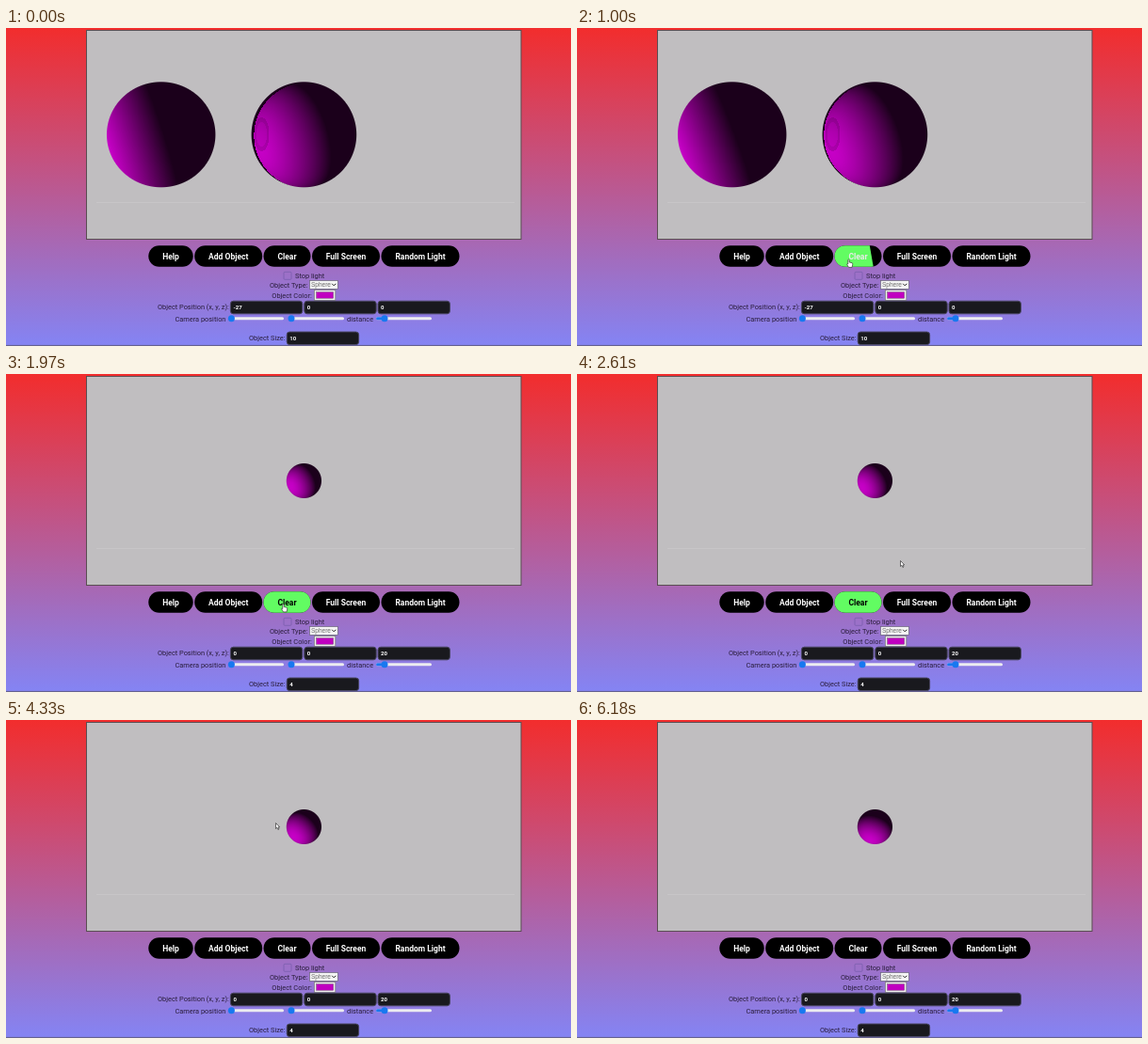
An HTML page with a canvas that plays this animation: 600 by 338 pixels, repeating every 6210 ms.

```html
<!DOCTYPE html>
<html lang="en">
<head>
<meta charset="utf-8">
<title>Sphere lighting demo</title>
<style>
  html, body { margin: 0; width: 100%; height: 100%; overflow: hidden; }
  body { background: linear-gradient(#f22d2d, #8484f4); }
  canvas, svg { position: absolute; left: 0; top: 0; width: 600px; height: 338px; }
  text { font: 7.4px Roboto, sans-serif; fill: #2a1d3c; }
  .btn { font-weight: 700; font-size: 8.5px; fill: #fff; text-anchor: middle; }
  .val { font-weight: 700; font-size: 6px; fill: #fff; }
  .opt { font: 6.5px "Liberation Sans", sans-serif; fill: #6c6c6c; }
</style>
</head>
<body>
<canvas id="view" width="600" height="338"></canvas>
<svg id="ui" viewBox="0 0 600 338"></svg>
<script>
const LOOP = 6210;
const CLEAR_FIELDS = 1310, CLEAR_SCENE = 1890;
const ui = document.getElementById('ui');
const view = document.getElementById('view').getContext('2d');

function add(tag, attrs, parent = ui) {
  const el = document.createElementNS('http://www.w3.org/2000/svg', tag);
  for (const k in attrs) el.setAttribute(k, attrs[k]);
  parent.appendChild(el);
  return el;
}

function box(x, y, width, height, fill, more = {}) {
  return add('rect', { x, y, width, height, fill, ...more });
}

function label(str, x, y, cls = '') {
  const el = add('text', { x, y, class: cls });
  el.textContent = str;
  return el;
}

// Buttons; the Clear pill carries a sliding fill
const pill = { rx: 11.3 };
const clip = add('clipPath', { id: 'pill' });
add('rect', { x: 273.5, y: 231.2, width: 50, height: 22.6, ...pill }, clip);
let fill, clearText;
for (const [name, x, w] of [
  ['Help', 151.3, 47.4], ['Add Object', 200.2, 72], ['Clear', 273.5, 50],
  ['Full Screen', 325, 72], ['Random Light', 398.5, 83]
]) {
  box(x, 231.2, w, 22.6, '#000', pill);
  if (name === 'Clear') fill = add('polygon', { fill: '#62fc62', 'clip-path': 'url(#pill)' });
  const text = label(name, x + w / 2, 245.5, 'btn');
  if (name === 'Clear') clearText = text;
}

// Form
box(295, 259.3, 8, 8, 'none', { stroke: '#7a5fae', 'stroke-width': .8, rx: 1 });
label('Stop light', 307, 266.2);
label('Object Type:', 280, 275.6);
box(322.4, 268.4, 30, 9, '#f4f4f4', { stroke: '#67627a', 'stroke-width': .7 });
label('Sphere', 324, 275.3, 'opt');
add('path', { d: 'M346.2 271.8l2 2 2-2', fill: 'none', stroke: '#222', 'stroke-width': 1 });
label('Object Color:', 282.3, 287.4);
box(327.4, 278.6, 22.4, 11, '#efefef', { stroke: '#777', 'stroke-width': .7 });
box(329.5, 280.6, 18.2, 6.8, '#c000c0', { stroke: '#666', 'stroke-width': .4 });

label('Object Position (x, y, z):', 161, 299.4);
label('Camera position', 179.5, 312.2);
label('distance', 362, 312.2);
label('Object Size:', 258, 331.8);

function field(x, y) {
  box(x, y, 76.4, 13.6, '#19191e', { rx: 3, stroke: '#48455f', 'stroke-width': 1 });
  return label('', x + 3, y + 9.2, 'val');
}
const fields = [field(238.4, 290.2), field(316.8, 290.2), field(395, 290.2), field(298.2, 323)];

for (const [x, thumb] of [[236, 239.4], [300, 303], [393, 402]]) {
  box(x, 307.3, 59, 3, '#ececf0', { rx: 1.5 });
  box(x, 307.3, thumb - x, 3, '#1878f0', { rx: 1.5 });
  add('circle', { cx: thumb, cy: 308.8, r: 3.5, fill: '#1878f0' });
}
box(0, 336.9, 600, 1.1, '#65618f');

// Pointer shapes, drawn from their tips
const ink = { fill: '#fff', stroke: '#333', 'stroke-width': .7, 'stroke-linejoin': 'round' };
const arrow = add('path', { d: 'M0 0V6L1.4 4.8 2.4 7 3.5 6.5 2.5 4.4H4.2Z', ...ink });
const hand = add('path', {
  d: 'M-.7 .5Q0-.5 .7 .5V3L3.6 3.7Q4.5 4 4.2 5.4L3.6 8.4H.1L-2 5.2Q-1.8 4-.7 5Z', ...ink
});

const path = [
  [640, 335, 326], [850, 291, 246], [1000, 288.5, 246], [1300, 294.5, 244.5],
  [2350, 294.5, 244.5], [2610, 343.5, 198.5], [3300, 372.5, 138],
  [3800, 350, 122], [4330, 286.5, 109.5], [4450, 286.5, 109.5]
];

const clamp = v => Math.max(0, Math.min(1, v));
const ramp = (t, a, b) => clamp((t - a) / (b - a));
const easeOut = p => 1 - Math.pow(1 - p, 2.3);
const mix = (a, b, p) => a + (b - a) * p;

function pointerAt(t) {
  const i = path.findIndex(k => k[0] > t);
  if (i < 1) return null;
  const [a, b] = [path[i - 1], path[i]];
  const p = ramp(t, a[0], b[0]);
  const s = p * p * (3 - 2 * p);
  return [mix(a[1], b[1], s), mix(a[2], b[2], s)];
}

function lightAngle(t) {
  const u = t / LOOP;
  return (17 + 12 * u + 40 * u * u) * Math.PI / 180;
}

// Lambert-shaded sphere; depth is how far the light leans to the viewer
const buffer = document.createElement('canvas');
const pen = buffer.getContext('2d');

function sphere({ cx, cy, rx, ry, depth, shadow = 0, ring = false }, angle) {
  const x0 = Math.floor(cx - rx) - 1, y0 = Math.floor(cy - ry) - 1;
  const w = Math.ceil(rx * 2) + 3, h = Math.ceil(ry * 2) + 3;
  buffer.width = w;
  buffer.height = h;
  const img = pen.createImageData(w, h);
  const side = Math.sqrt(1 - depth * depth);
  const lx = -Math.cos(angle) * side, ly = Math.sin(angle) * side;
  for (let j = 0; j < h; j++) for (let i = 0; i < w; i++) {
    const x = x0 + i + .5, y = y0 + j + .5;
    const nx = (x - cx) / rx, ny = (y - cy) / ry;
    const r = Math.hypot(nx, ny);
    const cover = clamp((1 - r) * ry + .5);
    if (!cover) continue;
    const nz = Math.sqrt(Math.max(0, 1 - r * r));
    let lit = Math.max(0, nx * lx + ny * ly + nz * depth);
    if (shadow && Math.hypot(nx - shadow, ny - shadow * .4) > 1) lit = 0;
    if (ring) {
      const e = Math.hypot((x - 271.5) / 8, (y - 113) / 18);
      if (e < 1) lit *= e > .72 ? .84 : .93;
    }
    const c = mix(27, 198, lit), k = (j * w + i) * 4;
    img.data[k] = img.data[k + 2] = c;
    img.data[k + 3] = cover * 255;
  }
  pen.putImageData(img, 0, 0);
  view.drawImage(buffer, x0, y0);
}

function drawScene(t) {
  view.clearRect(0, 0, 600, 338);
  view.fillStyle = '#5a4d52';
  view.fillRect(85, 2, 462.5, 223);
  view.fillStyle = '#c0bec0';
  view.fillRect(86, 3, 460.5, 221);
  view.fillStyle = 'rgba(255,255,255,.1)';
  view.fillRect(96, 185, 444, 1);
  const angle = lightAngle(t);
  if (t < CLEAR_SCENE) {
    sphere({ cx: 164.7, cy: 113.3, rx: 57.7, ry: 56, depth: .05 }, angle);
    const shadow = mix(.05, .018, ramp(t, 0, 1600));
    sphere({ cx: 316.4, cy: 113.3, rx: 55.8, ry: 56, depth: .45, shadow, ring: true }, angle);
  } else {
    sphere({ cx: 316.4, cy: 113.5, rx: 18.6, ry: 18.5, depth: .58 }, angle);
  }
}

function drawControls(t) {
  const values = t < CLEAR_FIELDS ? ['-27', '0', '0', '10'] : ['0', '0', '20', '4'];
  fields.forEach((el, i) => { if (el.textContent !== values[i]) el.textContent = values[i]; });

  const out = easeOut(ramp(t, 2630, 3030));
  const edge = 268 + 56 * easeOut(ramp(t, 800, 1200)) * (1 - out);
  fill.setAttribute('points', `266,231 ${edge - 2},231 ${edge + 2},254 266,254`);
  const tone = Math.round(255 * (1 - ramp(t, 980, 1240) * (1 - out)));
  clearText.style.fill = `rgb(${tone},${tone},${tone})`;

  const at = pointerAt(t);
  const over = at && at[0] > 273 && at[0] < 324 && at[1] > 231 && at[1] < 254;
  for (const [el, on] of [[arrow, at && !over], [hand, over]]) {
    el.style.display = on ? '' : 'none';
    if (on) el.setAttribute('transform', `translate(${at[0]} ${at[1]})`);
  }
}

const start = performance.now();
function frame() {
  const t = (performance.now() - start) % LOOP;
  drawScene(t);
  drawControls(t);
  requestAnimationFrame(frame);
}
frame();
</script>
</body>
</html>
```
